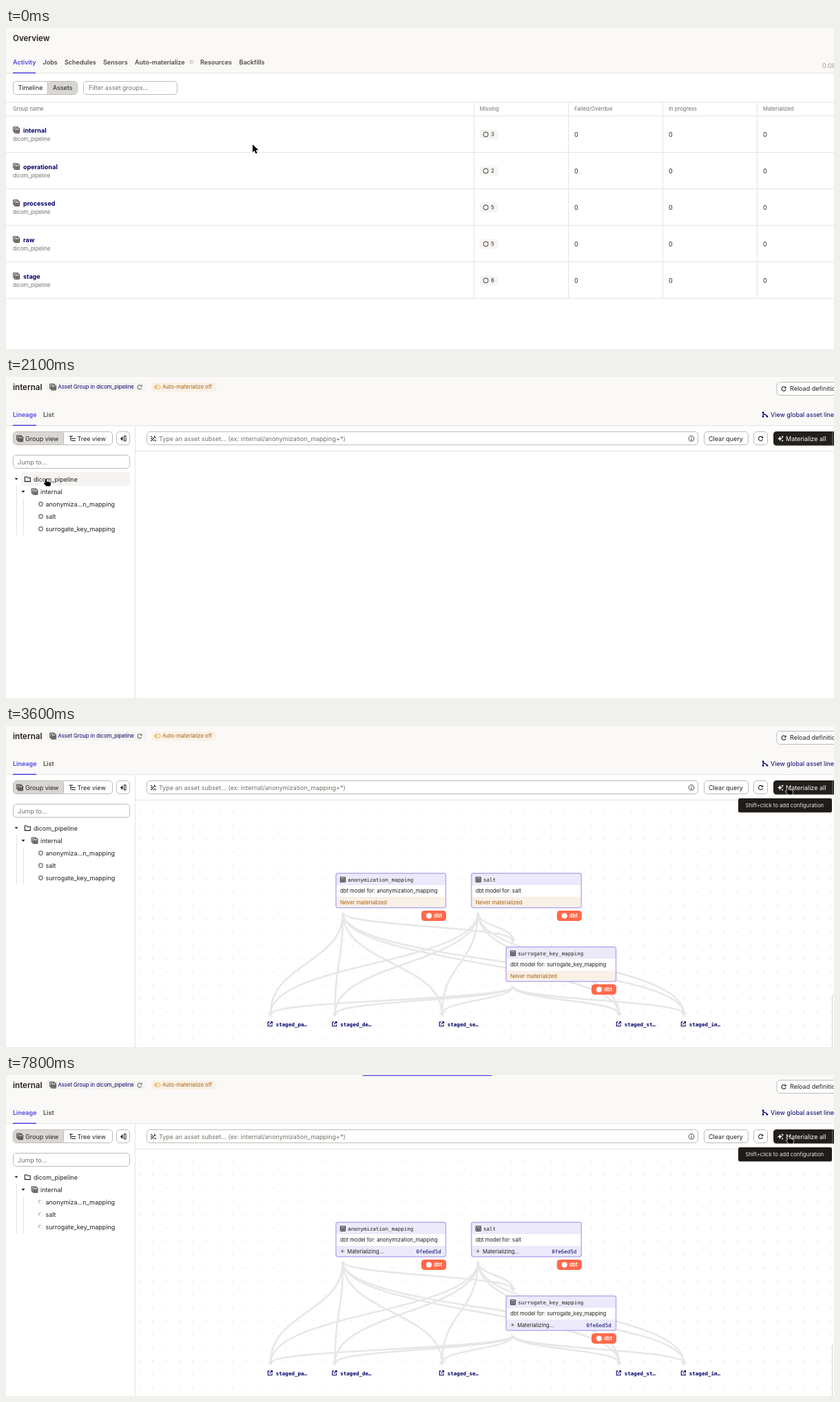
An HTML page for the animation above (8000 ms loop, 1202 by 466 pixels).

```html
<!DOCTYPE html>
<html lang="en">
<head>
<meta charset="utf-8">
<title>Asset overview</title>
<style>
html, body { margin: 0; width: 100%; height: 100%; overflow: hidden; background: #fff; }
svg { display: block; width: 1202px; height: 466px; }
text { font-family: Inter, sans-serif; white-space: pre; }
.mono { font-family: "DejaVu Sans Mono", monospace; }
</style>
</head>
<body>
<svg id="stage" viewBox="0 0 1202 466"></svg>
<script>
const INK = '#231f1b', GREY = '#757069', NAVY = '#04006b', BLUE = '#4f43dd';
const LINE = '#e6e4e1', EDGE = '#bfbbb6', AMBER = '#a8620f', LILAC = '#eceafa';
const S = 7.7, M = 9, L = 11.6;

// Shapes. Text is placed by the vertical middle of its capitals.
const text = (x, y, str, size = M, fill = INK, weight = 400, cls = '') =>
  `<text x="${x}" y="${y + size * .36}" font-size="${size}" fill="${fill}" font-weight="${weight}" class="${cls}">${str}</text>`;
const mono = (x, y, str, fill = INK, weight = 400) => text(x, y, str, 7.53, fill, weight, 'mono');
const rect = (x, y, w, h, fill, r = 0, stroke = 'none') =>
  `<rect x="${x}" y="${y}" width="${w}" height="${h}" rx="${r}" fill="${fill}" stroke="${stroke}"/>`;
const path = (d, stroke, width = 1, fill = 'none') =>
  `<path d="${d}" fill="${fill}" stroke="${stroke}" stroke-width="${width}"/>`;
const hline = (x, y, w, color = LINE) => path(`M${x} ${y}h${w}`, color);
const vline = (x, y, h, color = LINE) => path(`M${x} ${y}v${h}`, color);
const ring = (x, y, r) => `<circle cx="${x}" cy="${y}" r="${r}" fill="none" stroke="#6b655e" stroke-width="1.2"/>`;
const at = (x, y, inner) => `<g transform="translate(${x} ${y})">${inner}</g>`;
const group = (id, ...parts) => `<g id="${id}">${parts.join('')}</g>`;
const box = (x, y, w, h = 20) => rect(x + .5, y + .5, w - 1, h - 1, '#fff', 4.5, EDGE);

// Icons, each drawn around its own centre.
const groupIcon = (x, y, c = INK) => at(x, y,
  path('M-2.5 2.2H-4.3V-4.3H2.2V-2.5M-2.4-2.4H4.4V4.4H-2.4ZM-2.4 0H4.4M-2.4 2.2H4.4M0 0V4.4M2.2 0V4.4', c, .9));
const tableIcon = (x, y) => at(x, y,
  path('M-3.6-3.5H3.6V3.5H-3.6ZM-3.6-1.3H3.6M-3.6 1.1H3.6M-1.2-1.3V3.5M1.2-1.3V3.5', INK, .9));
const reload = (x, y, c = INK) => at(x, y,
  path('M2.6-1.6A3.1 3.1 0 1 0 3 1', c, 1.1) + path('M3.6-3.6V-.6H.6Z', 'none', 0, c));
const sparkle = c => path('M-1-3.6L.1-.9 2.8.2.1 1.3-1 4-2.1 1.3-4.8.2-2.1-.9ZM2.6-4.3L3.2-3 4.5-2.4 3.2-1.8 2.6-.5 2-1.8.7-2.4 2-3ZM2.6 1.4L3.1 2.6 4.3 3.1 3.1 3.6 2.6 4.8 2.1 3.6.9 3.1 2.1 2.6Z', 'none', 0, c);
const outLink = (x, y) => at(x, y, path('M-.6-2.6H-3V3.2H2.8V.8M.6-3.2H3.2V-.6M3.2-3.2L-.8.8', NAVY, 1.1));
const caret = (x, y) => path(`M${x - 2.5} ${y - 1.2}h5l-2.5 2.8z`, 'none', 0, INK);
const spinner = (x, y, cls, track, head) => at(x, y,
  `<circle r="2.8" fill="none" stroke="${track}"/><g class="${cls}">${path('M2.8 0A2.8 2.8 0 0 1-1 2.6', head)}</g>`);

function overview() {
  const tabs = [[53.5, 'Jobs'], [85, 'Schedules'], [141, 'Sensors'], [187, 'Auto-materialize'], [282, 'Resources'], [338.5, 'Backfills']];
  const heads = [[10, 'Group name'], [687.5, 'Missing'], [825, 'Failed/Overdue'], [962, 'In progress'], [1099, 'Materialized']];
  const rows = [['internal', 3], ['operational', 2], ['processed', 5], ['raw', 5], ['stage', 6]];
  return group('overview',
    rect(0, 0, 1202, 66, '#faf9f7'), hline(0, 65.5, 1202),
    text(10, 15, 'Overview', L, INK, 600),
    text(10, 49.7, 'Activity', M, BLUE, 600), rect(10, 64.5, 33, 1.5, BLUE),
    tabs.map(([x, s]) => text(x, 49.7, s, M, '#4f4a44', 600)).join(''),
    `<circle cx="269" cy="49" r="3.2" fill="#dcdad7"/>`,
    ...[8, 7, 6].map(n => group('tick' + n, text(1185, 55, '0:0' + n, M, '#9b968f'))),
    box(10, 77, 94), rect(61, 78, 42, 18, '#d9d7d4', 3.5), vline(60.5, 77, 20, EDGE),
    text(17.5, 87, 'Timeline'), text(68, 87, 'Assets'),
    box(112, 77, 137), text(120, 87, 'Filter asset groups...', M, GREY),
    [107.5, 127.5].map(y => hline(0, y, 1202)).join(''),
    heads.map(([x, s]) => text(x, 117.5, s, S, GREY)).join(''),
    [679.5, 816.5, 953.5, 1090.5].map(x => vline(x, 108, 284)).join(''),
    rows.map(([name, n], i) => {
      const y = 154.5 + i * 53;
      return groupIcon(15, y - 6.5) + text(25, y - 5.5, name, M, NAVY, 700) +
        text(10, y + 6.5, 'dicom_pipeline', S, GREY) + hline(0, y + 26, 1202) +
        rect(687.5, y - 7, 27, 14, '#f5f4f2', 4) + ring(696.5, y, 3.4) + text(704, y, n, S) +
        [825, 962, 1099].map(x => text(x, y + .3, '0')).join('');
    }).join(''),
    group('underline', hline(25, 154, 34, NAVY)));
}

function header() {
  return group('header',
    rect(0, 0, 1202, 71, '#faf9f7'), hline(0, 70.5, 1202),
    text(10, 15, 'internal', L, INK, 600),
    rect(59, 8, 144, 13.5, '#f5f4f2', 4), groupIcon(68, 14.5),
    text(75.5, 14.7, 'Asset Group in dicom_pipeline', S, NAVY), reload(194, 14.7, GREY),
    rect(212, 8, 93, 13.5, '#faf1e6', 4), rect(215.5, 12, 8.5, 5, 'none', 2.5, '#e8b04a'),
    `<circle cx="218" cy="14.5" r="1.3" fill="#e8b04a"/>`,
    text(227, 14.7, 'Auto-materialize off', S, AMBER),
    text(10, 55, 'Lineage', M, BLUE, 600), rect(10, 69.5, 34, 1.5, BLUE),
    text(54, 55, 'List', M, '#4f4a44', 600),
    box(1118.5, 7, 100), reload(1129, 17), text(1138, 17, 'Reload definitions'),
    at(1102, 54.5, path('M-3-3V3M-3 0H0Q2 0 3 2.5M-3-2.5L3 2.8', NAVY, 1) +
      '<g fill="#04006b"><circle cx="-3" cy="-3" r="1.3"/><circle cx="-3" cy="3" r="1.3"/><circle cx="3" cy="2.7" r="1.3"/></g>'),
    text(1110, 55, 'View global asset lineage', M, NAVY));
}

function chrome() {
  const leaves = [[184.5, 'anonymiza…n_mapping'], [202.5, 'salt'], [220.5, 'surrogate_key_mapping']];
  return group('chrome',
    vline(187.5, 71, 395), hline(188, 107.5, 1014),
    box(10, 79, 145), rect(11, 80, 72, 18, '#d9d7d4', 3.5), vline(83.5, 79, 20, EDGE),
    groupIcon(20, 89.3), text(28, 89.5, 'Group view'),
    path('M92 86h5M95 89.5h6M95 92.5h6M94 86v6.5', INK, 1.1), text(103.5, 89.5, 'Tree view'),
    box(160, 79, 20), path('M171.5 85.5h2.5v7.5h-2.5z', INK), path('M169.5 86v7l-3.6-3.5z', 'none', 0, INK),
    box(10, 113, 170), text(17, 123.5, 'Jump to...', M, GREY),
    group('hover', rect(22, 138, 158, 20, '#f5f4f2', 4)),
    vline(15.5, 158, 72), vline(25.5, 176, 54),
    caret(15, 148), path('M27.3 151.6v-6.6h3l1 1.2h4v5.4z', INK, 1.1), text(40, 148.3, 'dicom_pipeline'),
    caret(25, 166.3), groupIcon(41.5, 166.3), text(50, 166.5, 'internal'),
    leaves.map(([y, s]) => text(57.5, y, s)).join(''),
    group('rings', ...leaves.map(([y]) => ring(50.5, y, 2.8))),
    group('loaders', ...leaves.map(([y]) => spinner(50.3, y, 'turn', '#e9e7e5', '#8a857e'))),
    box(204, 79, 801), at(214, 89.3, path('M-3.8 3.8L1-1M-4-3.5L-1-1M1.5-4V-1.5H4M3.8 3.8L1.5 1.5M-4 .2H-2M0 4V2.3', INK, 1.1)),
    text(222, 89.5, 'Type an asset subset... (ex: internal/anonymization_mapping+*)', M, GREY),
    ring(995, 89.3, 3.8), path('M995 88.8v2.6M995 86.8v1', INK),
    box(1013, 79, 65), text(1020, 89.5, 'Clear query'),
    box(1085, 79, 21), reload(1095.5, 89.3),
    '<rect id="run" x="1114" y="79" width="100" height="20.5" rx="4.5"/>', vline(1200, 79, 20.5, '#77726c'),
    text(1132, 89.5, 'Materialize all', M, '#fff'),
    group('spark', at(1124.5, 89.3, sparkle('#fff'))),
    group('busy', spinner(1123.3, 89.3, 'spin', '#3a3632', '#a39e98')));
}

function card(x, y, name) {
  const top = y - .2;
  return rect(x, top, 159.5, 50, '#fff', 3) +
    path(`M${x} ${y + 17}V${y + 3}q0-3 3-3h153.500q3 0 3 3V${y + 17}z`, 'none', 0, LILAC) +
    tableIcon(x + 10, y + 9) + mono(x + 17.3, y + 9.2, name) +
    text(x + 6, y + 25.4, 'dbt model for: ' + name, S) +
    `<g class="idle">${rect(x, y + 34, 159.5, 16, '#f9f0e8', 2)}${text(x + 6, y + 42, 'Never materialized', S, AMBER)}</g>` +
    `<g class="live">${rect(x, y + 34, 159.5, 16, LILAC, 2)}` +
    `<circle cx="${x + 9.3}" cy="${y + 41.7}" r="1.5" fill="#6b655e"/>` +
    `<circle cx="${x + 9.3}" cy="${y + 41.7}" r="3" fill="none" stroke="#b9b5b0" stroke-width=".8" stroke-dasharray="1 1.1"/>` +
    `${text(x + 16.3, y + 42, 'Materializing...', S)}${mono(x + 116.5, y + 42, '0fe6ed5d', NAVY)}</g>` +
    `<rect x="${x}" y="${top}" width="159.500" height="50" rx="3" fill="none" stroke="#b5b0ef" stroke-width="1.500"/>` +
    rect(x + 124, y + 54, 36, 15, '#ff694a', 4.5) +
    `<circle cx="${x + 135}" cy="${y + 61.5}" r="4" fill="#fff"/>` +
    text(x + 142, y + 61.7, 'dbt', S, '#fff', 600);
}

function graph() {
  const ends = [[384, 'pa'], [477.5, 'de'], [633, 'se'], [890, 'st'], [984, 'im']];
  const edge = (x0, y0, x1, y1) => {
    const mid = (y0 + y1) / 2;
    return path(`M${x0} ${y0}C${x0} ${mid} ${x1} ${mid} ${x1} ${y1}`, '#e8e7e6', 2.6) +
      path(`M${x1 - 4} ${y1 - 2}h8l-4 6z`, 'none', 0, '#e8e7e6');
  };
  const fan = (x, y) => ends.map(([tx]) => edge(x, y, tx, 418)).join('');
  return group('graph',
    '<pattern id="dots" x="184" y="116" width="19.300" height="19.300" patternUnits="userSpaceOnUse"><circle cx="9.600" cy="9.600" r=".8" fill="#dddbd8"/></pattern>',
    rect(188, 108, 1014, 358, 'url(#dots)'),
    [489, 685].map(x => fan(x, 271) + edge(x, 271, 736, 311)).join(''), fan(736, 378),
    card(479, 214, 'anonymization_mapping'), card(675.7, 214, 'salt'), card(726, 321, 'surrogate_key_mapping'),
    ends.map(([x, s]) => outLink(x - .7, 432.5) + mono(x + 7.8, 433, `staged_${s}…`, NAVY, 700)).join(''),
    rect(1199.5, 389.5, 20, 90, '#fff', 4, '#d3d0cc'));
}

const pointer = (id, d) => group(id, `<path d="${d}" fill="#000" stroke="#fff" stroke-width="1.200" stroke-linejoin="round" paint-order="stroke"/>`);

document.getElementById('stage').innerHTML =
  overview() + header() + chrome() + graph() +
  group('toast', rect(516, -10, 191, 12.5, '#d9d6ee', 4), rect(517, -10, 189, 11, BLUE, 3)) +
  group('tip', rect(1063, 105, 136, 20.5, '#1f1b18', 2.5), text(1073.5, 115.2, 'Shift+click to add configuration', S, '#e9e7e4')) +
  group('cursor',
    pointer('arrow', 'M0 0V11.5L2.7 9 4.6 13.400 6.6 12.500 4.700 8.300H8.400Z'),
    pointer('hand', 'M2.600 1.200q1-1 2 0L4.700 4.500 9.800 5.400q1.600.5 1.400 2.200L10.400 11.600H4.300L.8 7.600q0-1.500 1.400-1L2.800 7Z'),
    pointer('grab', 'M.8 6q1-1 2 .5L3 2q1-1 1.800 0L5.400 1q1-.8 1.800.2L7.800 1.800q1-.6 1.700.4L10 4q1-.4 1.400.6L10.600 9 9.600 12.400H4.400Z'));

// Timeline: each value holds until the next time, in ms.
const LOOP = 8000;
let css = '', count = 0;
function track(sel, prop, steps) {
  const name = 'k' + count++;
  const keys = [...steps, [LOOP, steps[steps.length - 1][1]]];
  css += `@keyframes ${name}{${keys.map(([t, v]) => `${t * 100 / LOOP}%{${prop}:${v}}`).join('')}}` +
    `${sel}{animation:${name} ${LOOP}ms step-end infinite}\n`;
}
function show(sel, ...spans) {
  const steps = spans.flatMap(([from, to]) => [[from, 1], [to, 0]]).filter(([t]) => t < LOOP);
  track(sel, 'opacity', steps[0][0] ? [[0, 0], ...steps] : steps);
}
const rotate = (sel, times, angle) =>
  track(sel, 'transform', [[0, 'rotate(0deg)'], ...times.map((t, i) => [t, `rotate(${i * angle}deg)`])]);

show('#overview', [0, 1900]);
show('#tick8', [0, 600]);
show('#tick7', [600, 1600]);
show('#tick6', [1600, 1900]);
show('#underline', [1300, 1900]);
show('#header', [2000, LOOP]);
show('#chrome', [2100, LOOP]);
show('#graph', [2200, LOOP]);
show('#hover', [2100, 2400]);
show('#tip', [3600, LOOP]);
show('#spark', [0, 4200], [6000, LOOP]);
show('#busy', [4200, 6000]);
show('#rings, .idle', [0, 5300]);
show('#loaders, .live', [5300, LOOP]);
show('#toast', [6500, LOOP]);
track('#run', 'fill', [[0, INK], [4100, '#3b3733'], [4300, INK]]);
rotate('.spin', [4200, 4300, 4400, 4600, 4800, 5300, 5600], 75);
rotate('.turn', [5300, 5600, 6000, 6500, 6800, 7200, 7600, 7800], 125);

show('#arrow', [0, 1300], [1900, 2100], [2300, 2400]);
show('#hand', [1300, 1900], [2100, 2300], [3300, LOOP]);
show('#grab', [2400, 3300]);
const stops = [
  [0, 358, 169], [400, 352, 172], [500, 332, 175], [600, 294, 174], [700, 248, 171], [800, 200, 167],
  [900, 156, 162], [1000, 118, 158], [1100, 95, 154], [1200, 79, 150], [1300, 55, 149], [1400, 51, 148],
  [1500, 49, 147], [1900, 52, 147], [2100, 54, 147], [2200, 56, 147], [2300, 150, 145], [2400, 370, 137],
  [2500, 600, 128], [2600, 795, 120], [2800, 921, 113], [3000, 985, 112], [3100, 1016, 111],
  [3300, 1111, 93], [3500, 1131, 88], [3800, 1132, 88]
];
track('#cursor', 'transform', stops.map(([t, x, y]) => [t, `translate(${x}px,${y}px)`]));

document.head.appendChild(document.createElement('style')).textContent = css;
</script>
</body>
</html>
```
